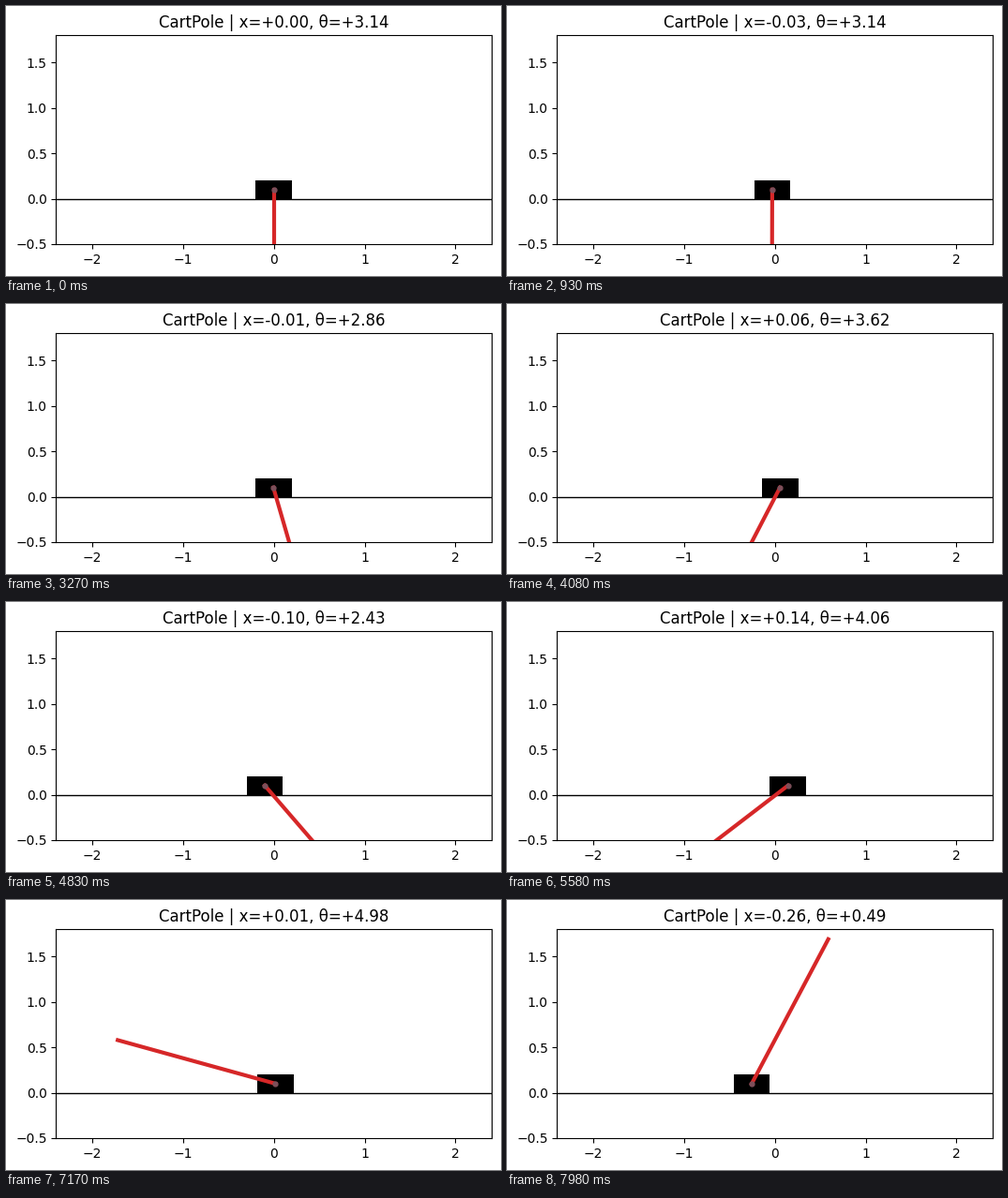
Recreate the animation shown at these times as a matplotlib script. Size 528 by 288 pixels, loop 8 s.

```python
import math

import matplotlib.pyplot as plt
import numpy as np
from matplotlib.animation import FuncAnimation
from matplotlib.patches import Rectangle

W, H, DPI = 528, 288, 100
STEP = 30            # ms per frame
FRAMES = 267
POLE = 1.8
PIVOT_Y = 0.1
CART_W, CART_H = 0.4, 0.2

SWINGS = 11
FIRST_PEAK = 638     # ms
HALF_PERIOD = 680    # ms, for small swings
CART_LAG = 280       # ms the cart turns after the pole

n = np.arange(SWINGS)
side = (-1.0) ** n

# The pole's swings are pumped up geometrically between a few sizes
size = np.exp(np.interp(n, [0, 2, 4, 6, 8, 10],
                        np.log([0.026, 0.085, 0.302, 0.78, 1.5, 2.72])))
# Larger swings take longer, as for any pendulum
mean = (size[1:] + size[:-1]) / 2
spans = HALF_PERIOD * (1 + 0.055 * mean**2 + 0.0057 * mean**4)
peaks = FIRST_PEAK + np.concatenate([[0], np.cumsum(spans)])
# The cart sways against the pole, and drifts left at the end
reach = np.interp(n, [0, 2, 5, 7, 9, 10],
                  [0.03, 0.02, 0.11, 0.18, 0.025, 0.362])


def sway(t, times, values):
    """Cosine swing from rest through successive turning points."""
    times, values = np.append(0, times), np.append(0, values)
    i = min(np.searchsorted(times, t, side="right") - 1, len(times) - 2)
    u = (t - times[i]) / (times[i + 1] - times[i])
    ease = (1 - math.cos(math.pi * u)) / 2
    return values[i] + (values[i + 1] - values[i]) * ease


fig = plt.figure(figsize=(W / DPI, H / DPI), dpi=DPI, facecolor="white")
left, right, top, bottom = 53.4, 518.2, 31.24, 253.94
ax = fig.add_axes([left / W, 1 - bottom / H,
                   (right - left) / W, (bottom - top) / H])
ax.set_xlim(-2.4, 2.4)
ax.set_ylim(-0.5, 1.8)
ax.set_xticks(range(-2, 3))
ax.set_yticks(np.arange(-0.5, 1.6, 0.5))

ax.axhline(0, color="black", lw=1)
cart = ax.add_patch(Rectangle((0, 0), CART_W, CART_H, fc="black", zorder=2))
pole, = ax.plot([], [], color="tab:red", lw=3, zorder=3)
pivot, = ax.plot([], [], "o", color="#7d4f5a", ms=3.5, zorder=4)
title = ax.set_title("")


def update(i):
    t = i * STEP
    x = sway(t, peaks + CART_LAG, -side * reach)
    theta = math.pi - sway(t, peaks, side * size)
    cart.set_x(x - CART_W / 2)
    pole.set_data([x, x + POLE * math.sin(theta)],
                  [PIVOT_Y, PIVOT_Y + POLE * math.cos(theta)])
    pivot.set_data([x], [PIVOT_Y])
    title.set_text(f"CartPole | x={x:+.2f}, θ={theta:+.2f}")
    return cart, pole, pivot, title


anim = FuncAnimation(fig, update, frames=FRAMES, init_func=lambda: update(0),
                     interval=STEP, repeat=True, repeat_delay=0, blit=False)
plt.show()
```
